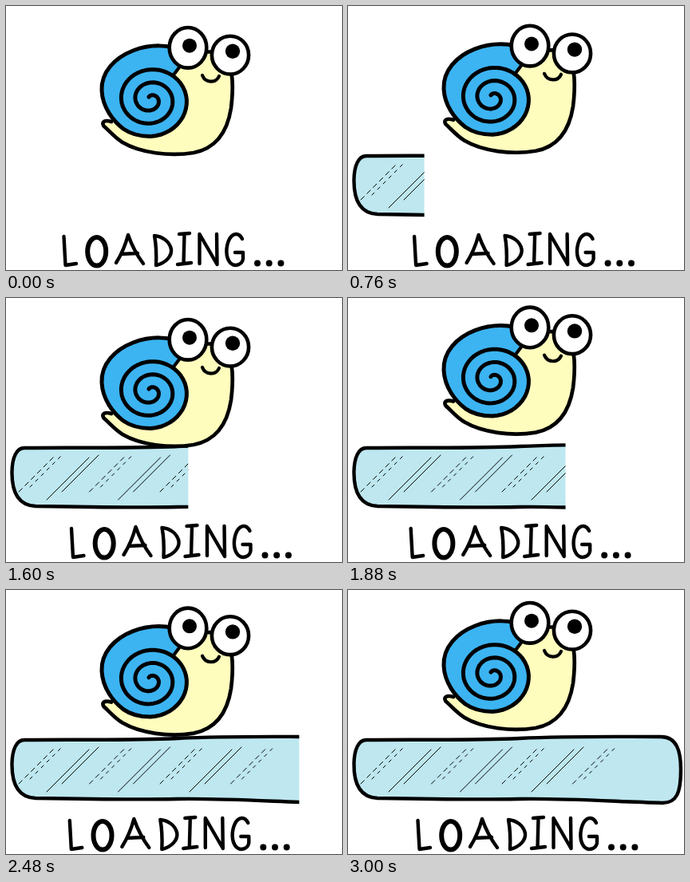
An HTML page that plays this animation: 421x331 px, repeating every 3.04 s.

```html
<!DOCTYPE html>
<html lang="en">
<head>
<meta charset="utf-8">
<title>Loading snail</title>
<style>
  html, body { margin: 0; width: 100%; height: 100%; overflow: hidden; background: #fff; }
  svg { display: block; width: 421px; height: 331px; }
  .ink { fill: none; stroke: #000; stroke-linecap: round; stroke-linejoin: round; }
</style>
</head>
<body>
<svg viewBox="0 0 421 331">
  <defs>
    <clipPath id="reveal"><rect id="edge" y="170" width="0" height="110"/></clipPath>
  </defs>

  <g clip-path="url(#reveal)">
    <path class="ink" style="fill:#bee7f0" stroke-width="4.4"
      d="M23 188 C90 187 150 189 215 186 S330 184 392 184 C412 184 417 202 417 225
         C417 254 412 267 394 267 C330 265 270 261 215 262 S90 262 37 261
         C15 260 7 243 7.5 217 C8 200 13 188 23 188Z"/>
    <g id="shine" class="ink" stroke-width="1"></g>
  </g>

  <g id="snail" class="ink" stroke-width="4.7">
    <path fill="#fffdbd" d="M214 78 L222 57.5 L276 57.5 C285 82 285 104 282 128 C277 160 261 179 235 184
      C205 189 168 184 146 171 C135 164 129 156 122.5 150.5 C119 145 124 142.5 132 145"/>
    <path id="shell" fill="#3cb4f2" stroke-width="5"/>
    <path stroke-width="4.2" d="M211 85 L217 77 M246 87 C250 97 263 97 267 88"/>
    <g fill="#fff" stroke-width="4.6">
      <ellipse cx="228" cy="52.3" rx="23.3" ry="25.3"/>
      <ellipse cx="281" cy="61.6" rx="23.1" ry="23.9"/>
    </g>
    <g fill="#000" stroke="none">
      <circle cx="230" cy="49.7" r="9"/>
      <circle cx="284" cy="56.8" r="9.2"/>
    </g>
  </g>

  <g id="label" class="ink" stroke-width="4.4" role="img" aria-label="LOADING...">
    <path d="M72.5 289 L74.5 325 L88 323"/>
    <ellipse cx="113.7" cy="307.7" rx="11.5" ry="17.8" stroke-width="6"/>
    <path d="M138 322 Q148 306 153 287 Q160 307 172 323 M145 311 L165 310"/>
    <path d="M186 288 Q189 304 188 325 C201 322 208 313 207 305 C205 295 196 289 186 288"/>
    <path d="M217 286 L230 285 M223.5 286 L222.5 323 M215 324 L232 322"/>
    <path d="M242.5 323 L242.5 286 L264.5 324 L264 286"/>
    <path d="M296 292 C292 284 285 284 280 292 C275 302 275 315 281 322 C287 328 296 324 297 317 L297 309 L287 309"/>
    <path id="dots" stroke-width="8"/>
  </g>
</svg>
<script>
const LOOP = 3040, STEP = 40, HALF = 400;
const $ = id => document.getElementById(id);
const range = n => [...Array(n).keys()];

// Spiral measured in quarter turns, from the bottom of the shell to its centre
function spiral(q) {
  const r = 47.4 - 4.2 * q, a = q * Math.PI / 2;
  return `L${(181 + 1.05 * r * Math.sin(a)).toFixed(1)} ${(117.5 + 0.97 * r * Math.cos(a)).toFixed(1)}`;
}
const back = "M228 66 L222 58 C205 47 180 48 159 56 C136 65 119 83 120 106 C121 127 134 144 147 154 C157 161 169 163.5 181 163.5";
$("shell").setAttribute("d", back + range(125).map(i => spiral(i / 12)).join(""));

$("dots").setAttribute("d", range(3).map(i => `M${315 + 14.7 * i} 322.5h0`).join(""));

// Every reflection runs at 45 degrees, so x + y = sum along it
const ray = (sum, low, high, dash = "none") =>
  `<path d="M${sum - low} ${low}L${sum - high} ${high}" stroke-dasharray="${dash}"/>`;
const glint = k => ray(259 + 88.5 * k, 243, 197, "6 5") + ray(267 + 88.5 * k, 237, 195, "4 6");
const streak = k => ray(304 + 89.5 * k, 253, 200) + ray(313 + 89.5 * k, 243, 197);
$("shine").innerHTML = range(4).map(glint).join("") + range(3).map(streak).join("");

// 0 at the start of each cycle, 1 halfway through
const wave = t => 1 - Math.abs((t % (2 * HALF)) / HALF - 1);

function draw(t) {
  const rise = -22 * wave(t);
  const slide = t < 600 ? t / 40 : 15 - 11 * wave(t - 600);
  $("snail").setAttribute("transform", `translate(0 ${rise})`);
  $("label").setAttribute("transform", `translate(${slide} 0)`);
  $("edge").setAttribute("width", Math.max(0, 0.158 * t - 24.5));
}

const start = performance.now();
function tick() {
  const t = (performance.now() - start) % LOOP;
  draw(Math.floor(t / STEP) * STEP);
  requestAnimationFrame(tick);
}
tick();
</script>
</body>
</html>
```
